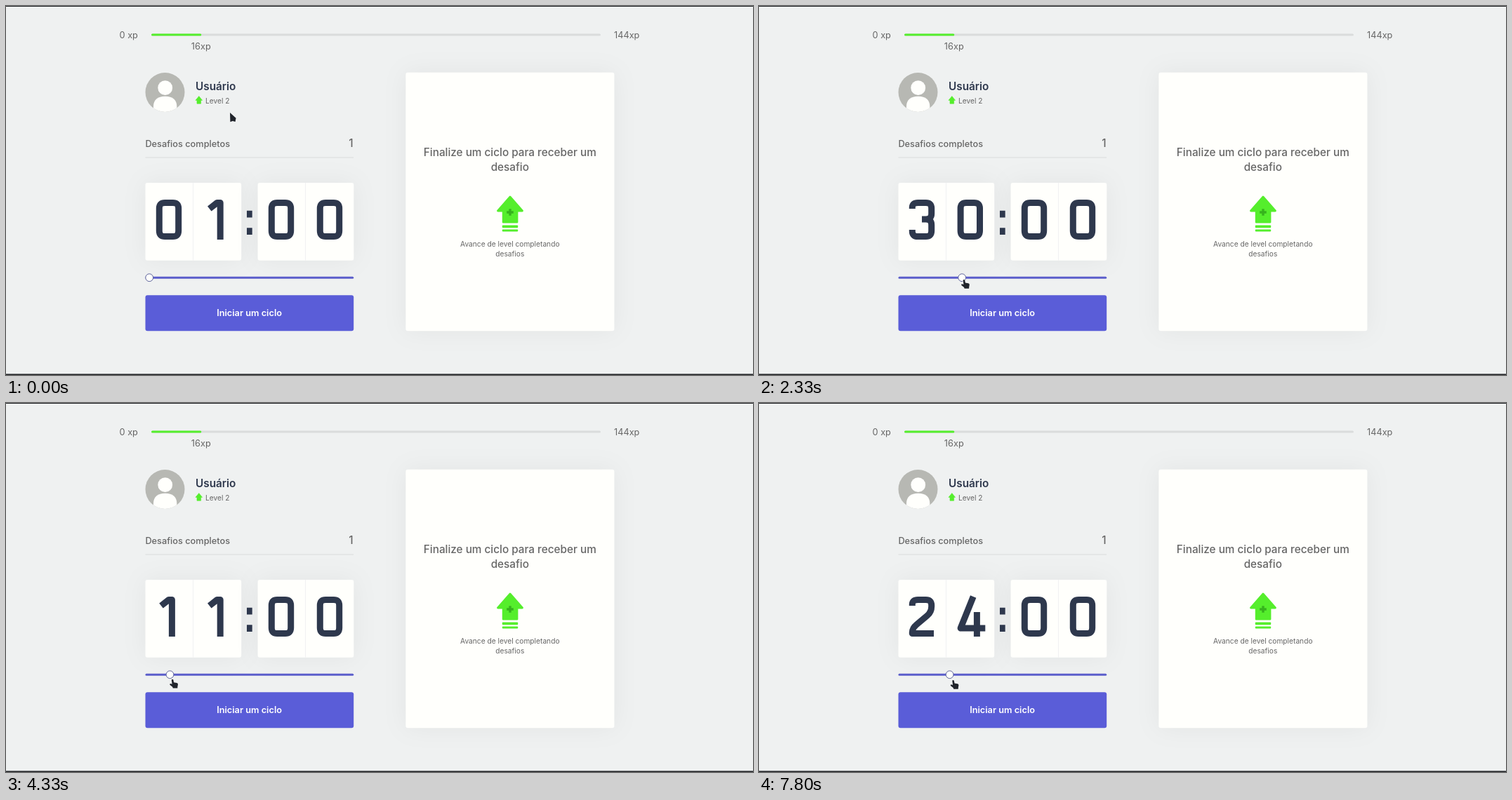
Recreate the animation shown at these times as an HTML page. Size 1064 by 526 pixels, loop 8000 ms.

```html
<!DOCTYPE html>
<html lang="pt-BR">
<head>
<meta charset="utf-8">
<title>Ciclo</title>
<style>
html, body { margin: 0; width: 100%; height: 100%; overflow: hidden; background: #eff1f1; }
svg { display: block; width: 1064px; height: 526px; }
text { font-family: Inter, sans-serif; font-size: 12.75px; fill: #666; }
.small { font-size: 10.2px; }
.big { font-size: 15.3px; font-weight: 500; }
.mid { text-anchor: middle; }
.card { fill: #fffffc; filter: drop-shadow(0 0 17px rgba(0, 0, 0, .05)); }
.digit { fill: none; stroke: #2e384d; stroke-width: 9; stroke-linejoin: round; }
.cursor { fill: #20242b; stroke: #fff; stroke-width: 1; stroke-linejoin: round; paint-order: stroke; }
</style>
</head>
<body>
<svg viewBox="0 0 1064 526">
  <defs><clipPath id="face"><circle cx="226.5" cy="123" r="28"/></clipPath></defs>
  <rect width="1064" height="526" fill="#eff1f1"/>
  <rect width="1064" height="1" fill="#25272a"/>
  <rect y="524.4" width="1064" height="1.6" fill="#25272a"/>

  <text x="161.5" y="45.6">0 xp</text>
  <text x="866" y="45.6">144xp</text>
  <rect x="207" y="39.5" width="640" height="3" rx="1.5" fill="#dadcdc"/>
  <rect x="207" y="39.5" width="71.3" height="3" rx="1.5" fill="#55ee2c"/>
  <text class="mid" x="277.8" y="61.6">16xp</text>

  <g clip-path="url(#face)">
    <rect x="198" y="95" width="57" height="57" fill="#b7b8b3"/>
    <circle cx="226.7" cy="116.7" r="10.4" fill="#fffffc"/>
    <path d="M210 152V143C210 134 216 128.8 226.7 128.8S243.3 134 243.3 143V152Z" fill="#fffffc"/>
  </g>
  <text x="270" y="119.6" style="font-size:15.3px;font-weight:600;fill:#2e384d">Usuário</text>
  <path d="M274.8 128.6L279.6 134.4H277.6V139.2H272V134.4H270Z" fill="#55ee2c" stroke="#55ee2c" stroke-width=".6" stroke-linejoin="round"/>
  <text class="small" x="284" y="139.2">Level 2</text>

  <text x="198.4" y="200.6" font-weight="500">Desafios completos</text>
  <text class="big" x="494.6" y="201.4" text-anchor="end">1</text>
  <rect x="198.5" y="215.5" width="296.5" height="1" fill="#d9dbdc"/>

  <rect class="card" x="198.5" y="252" width="136.7" height="110.7" rx="3"/>
  <rect class="card" x="358.6" y="252" width="136.7" height="110.7" rx="3"/>
  <path d="M266.5 252V362.7M426.5 252V362.7" stroke="#f0f1f2"/>
  <path d="M343 291.8H350.7V301.6H343ZM343 316.3H350.7V326.1H343Z" fill="#2e384d"/>
  <g id="clock"></g>

  <rect x="198.5" y="385.7" width="296.7" height="3" rx="1.5" fill="#5b5ecb"/>
  <circle id="thumb" cy="387.2" r="5.4" fill="#fffffc" stroke="#5d639c"/>
  <rect x="198.5" y="412.2" width="296.7" height="51" rx="3" fill="#5a5dd8"/>
  <text class="mid" x="346.6" y="441.9" style="font-weight:600;fill:#fff">Iniciar um ciclo</text>

  <rect class="card" x="569.4" y="94.8" width="297" height="368.4" rx="3"/>
  <text class="big mid" x="717.8" y="213.6">Finalize um ciclo para receber um</text>
  <text class="big mid" x="717.8" y="234.9">desafio</text>
  <g fill="#55ee2c">
    <path d="M718 272L735.5 292H728V308.2H708.2V292H700.5Z" stroke="#55ee2c" stroke-width="2.8" stroke-linejoin="round"/>
    <rect x="706.8" y="312.4" width="22.4" height="3.8" rx="1"/>
    <rect x="706.8" y="318.6" width="22.4" height="2.9" rx="1"/>
  </g>
  <path d="M713.2 294H722.8M718 289.2V298.8" stroke="#36b31d" stroke-width="3.4"/>
  <text class="small mid" x="717.8" y="343.2">Avance de level completando</text>
  <text class="small mid" x="717.8" y="357.4">desafios</text>

  <path id="arrow" class="cursor" d="M0 0L8.6 7.8L7.6 13L3.8 12L.4 13.2Z"/>
  <path id="hand" class="cursor" d="M3.4 1.2Q4.8 -.2 6 1.2L6.7 5L11 5.8Q12.8 6.2 12.6 8L12 11.4V13.2H5.4L4.8 11.4L1 8.6Q.4 7 2.2 6.8L4.2 7.6Z"/>
</svg>
<script>
const LOOP = 8000, FPS = 15, RADIUS = 8;
const GRAB = 21; // tick at which the hand takes the thumb
const $ = id => document.getElementById(id);

// Digits are bent lines through a small grid: column letter, row letter, "!" for a sharp corner
const COL = { w: -16, l: -13.7, f: -11, g: -7, c: 0, s: 4.4, y: 9.6, r: 13.7, e: 17, x: 21.5 };
const ROW = { o: 0, t: 4.4, u: 13, k: 22, m: 28, d: 43, h: 45, b: 52.6, z: 57 };
const GLYPHS = [
  'ct rt rb lb lt ct',
  'fu ct! st! sz',
  'lu lt rt rk lh lb! eb',
  'lu lt rt rm cm,cm rm rb lb ld',
  'so lh! xh,yk yz',
  'rt lt! lk! rk rb lb ld',
  'rt lt lb rb rk lk',
  'wt rt! gz',
  'ct rt rm lm lt ct,cm rm rb lb lm cm',
  'lb rb rt lt lm rm'
];

function bend(route) {
  const pts = route.split(' ').map(s => ({ x: COL[s[0]], y: ROW[s[1]], sharp: s[2] === '!' }));
  const toward = (p, q) => {
    const len = Math.hypot(q.x - p.x, q.y - p.y);
    const f = p.sharp ? 0 : Math.min(RADIUS / len, .8);
    return `${p.x + (q.x - p.x) * f} ${p.y + (q.y - p.y) * f}`;
  };
  return pts.map((p, i) => {
    if (i === 0) return `M${p.x} ${p.y}`;
    if (i === pts.length - 1) return `L${p.x} ${p.y}`;
    return `L${toward(p, pts[i - 1])}Q${p.x} ${p.y} ${toward(p, pts[i + 1])}`;
  }).join('');
}
const shapes = GLYPHS.map(g => g.split(',').map(bend).join(''));

const digits = [232, 300.8, 392, 461].map(x => {
  const p = document.createElementNS('http://www.w3.org/2000/svg', 'path');
  p.setAttribute('class', 'digit');
  p.setAttribute('transform', `translate(${x} 276)`);
  return $('clock').appendChild(p);
});

// Turning points of the drag: [tick, minutes]
const TURNS = [
  [23, 1], [34, 29], [36, 31], [39, 48], [41, 48], [53, 21], [59, 12], [68, 10],
  [72, 10], [74, 16], [76, 16], [86, 20], [93, 24], [96, 28], [103, 26], [113, 26], [117, 24]
];

const clamp = v => Math.max(0, Math.min(1, v));
const mix = (a, b, f) => a + (b - a) * f;
const smooth = f => f * f * (3 - 2 * f);
const thumbX = min => 204.2 + (min - 1) * 2.93;

function minutesAt(tick) {
  return TURNS.slice(1).reduce((v, [t, m], i) => {
    const [t0, m0] = TURNS[i];
    return tick > t0 ? mix(m0, m, clamp((tick - t0) / (t - t0))) : v;
  }, TURNS[0][1]);
}

function arrowAt(tick) {
  if (tick < 1) return [319, 152];
  const f = smooth(clamp((tick - 8) / 10));
  return [mix(322, 207, f), mix(155, 395, f)];
}

// The hand trails the thumb by half a tick and sinks a little on the way
function handAt(tick) {
  return [thumbX(minutesAt(tick - .5)) - .5, mix(389.5, 394.5, clamp((tick - 35) / 40))];
}

function draw(ms) {
  const tick = Math.floor((ms + 4) * FPS / 1000);
  const min = Math.round(minutesAt(tick));
  const held = tick >= GRAB;
  const [x, y] = held ? handAt(tick) : arrowAt(tick);
  [Math.floor(min / 10), min % 10, 0, 0].forEach((n, i) => digits[i].setAttribute('d', shapes[n]));
  $('thumb').setAttribute('cx', thumbX(min));
  $(held ? 'hand' : 'arrow').setAttribute('transform', `translate(${x} ${y})`);
  $('hand').style.display = held ? '' : 'none';
  $('arrow').style.display = held ? 'none' : '';
}

const start = performance.now();
function loop() {
  draw((performance.now() - start) % LOOP);
  requestAnimationFrame(loop);
}
draw(0);
requestAnimationFrame(loop);
</script>
</body>
</html>
```
